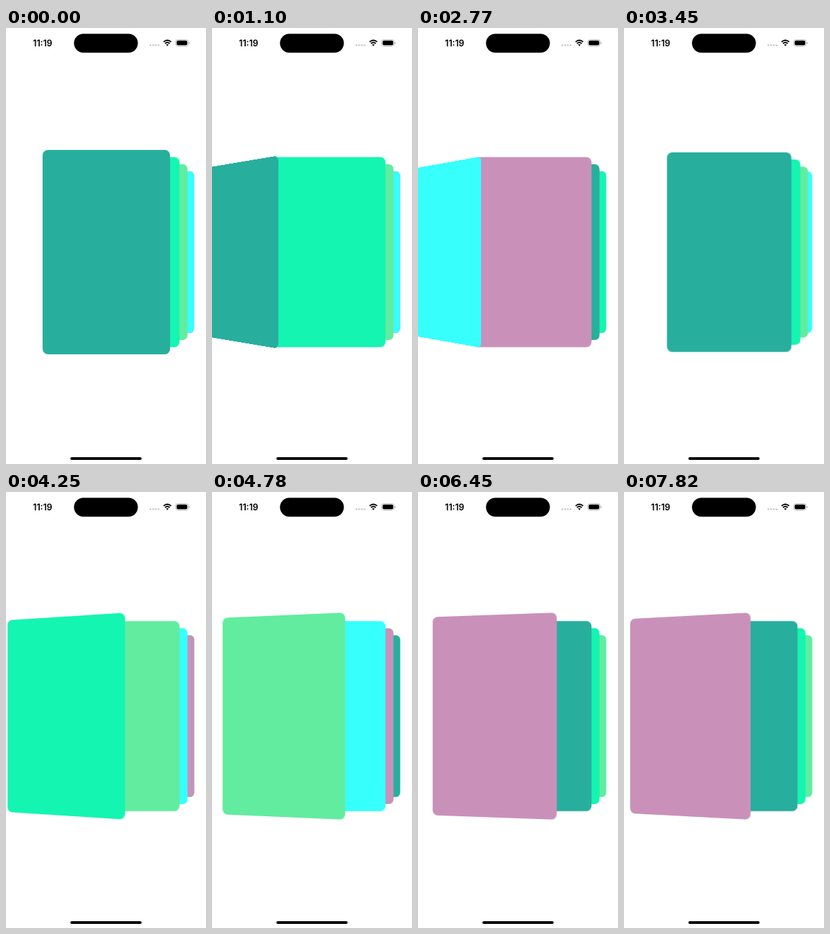
These frames come from a looping animation (295 px wide and 640 px high, 8 s). An HTML page:

```html
<!DOCTYPE html>
<html lang="en">
<head>
<meta charset="utf-8">
<title>Looping card stack</title>
<style>
  html, body { margin: 0; width: 100%; height: 100%; overflow: hidden; background: #fff; }
  #stage { position: relative; width: 295px; height: 640px; overflow: hidden; background: #fff; }
  .card {
    position: absolute; left: 53.75px; top: 179.3px;
    width: 187.5px; height: 300px; border-radius: 8px;
  }
  svg { position: absolute; inset: 0; z-index: 10; }
  text { font: 600 12.8px Inter, "Liberation Sans", sans-serif; }
</style>
</head>
<body>
<div id="stage">
  <svg width="295" height="640" viewBox="0 0 295 640">
    <text x="54" y="26.5" text-anchor="middle">11:19</text>
    <rect x="100.3" y="8.5" width="94.2" height="27.7" rx="13.85"/>
    <g fill="#c6c6c6">
      <circle cx="213" cy="25.2" r="1.3"/>
      <circle cx="217" cy="25.2" r="1.3"/>
      <circle cx="221" cy="25.2" r="1.3"/>
      <circle cx="225" cy="25.2" r="1.3"/>
    </g>
    <g fill="none" stroke="#000" stroke-width="1.9">
      <path d="M232.4 20.4Q238 15.4 243.6 20.4"/>
      <path d="M234.5 22.8Q238 19.7 241.5 22.8"/>
    </g>
    <path d="M236.1 24.6Q238 23 239.9 24.6L238 26.6Z"/>
    <rect x="250.4" y="17.3" width="18.2" height="9.2" rx="3" fill="none" stroke="#a8a8a8" stroke-width=".9"/>
    <rect x="251.7" y="18.6" width="15.6" height="6.6" rx="1.9"/>
    <path d="M269.6 20.4q1.3 .4 1.3 1.5t-1.3 1.5z" fill="#a8a8a8"/>
    <rect x="95" y="630" width="105" height="4" rx="2"/>
  </svg>
</div>
<script>
const LOOP = 8000, WIDTH = 187.5, TILT = 40, STEP = 112, START = 860;
const colors = ['#28ae9d', '#14f5b1', '#62ec9f', '#36fffc', '#c991b9'];

// Moments at which the front card moves to the back of the stack.
const wraps = [1150, 1688, 2250, 2814, 3345, 3880, 4422, 5010, 5612];

// Hesitant final drag: [time, distance], held between entries.
const lastDrag = [
  [6012, 7], [6130, 17], [6250, 23], [6350, 31], [6450, 37.5], [6640, 28],
  [6760, 17], [7400, 4], [7500, 0], [7610, 14], [7710, 36], [7820, 55]
];

const stage = document.getElementById('stage');
const cards = colors.map(color => {
  const card = document.createElement('div');
  card.className = 'card';
  card.style.background = color;
  return stage.appendChild(card);
});

// Remaining distance of a critically damped spring.
const remaining = (ms, rate) => (1 + rate * ms) * Math.exp(-rate * ms);

// Drag, throw and return of one card; ms is relative to its wrap.
function swipe(ms) {
  if (ms < -330) return 0;
  if (ms < -150) return 110 * ((ms + 330) / 180) ** 1.5;
  if (ms < 0) return WIDTH - 77.5 * remaining(ms + 150, .025);
  return WIDTH * remaining(ms, .04);
}

function place(card, index, depth, drag) {
  const scale = 1 - .07 * depth;
  const shift = 15 * depth * scale + WIDTH / 2 * (1 - scale) - drag;
  const angle = -TILT * Math.min(drag / WIDTH, 1);
  card.style.zIndex = 5 - index;
  card.style.transform =
    `perspective(600px) rotateY(${angle}deg) translateX(${shift}px) scale(${scale})`;
}

function render(now) {
  const time = now < START ? 0 : START + Math.floor((now - START) / STEP) * STEP;
  const done = wraps.filter(w => w <= time).length;
  const since = done ? time - wraps[done - 1] : 0;
  const settle = remaining(since, .025);
  const held = lastDrag.filter(([at]) => at <= now).pop();

  cards.forEach((card, i) => {
    const index = (i - done + 10) % 5;
    const before = done ? (index + 1) % 5 : index;
    const target = Math.min(index, 3);
    const depth = target + (Math.min(before, 3) - target) * settle;
    let drag = 0;
    if (index === 0) drag = done < wraps.length ? swipe(time - wraps[done]) : held ? held[1] : 0;
    else if (index === 4 && done) drag = swipe(since);
    place(card, index, depth, drag);
  });
}

function tick() {
  render(performance.now() % LOOP);
  requestAnimationFrame(tick);
}
tick();
</script>
</body>
</html>
```
